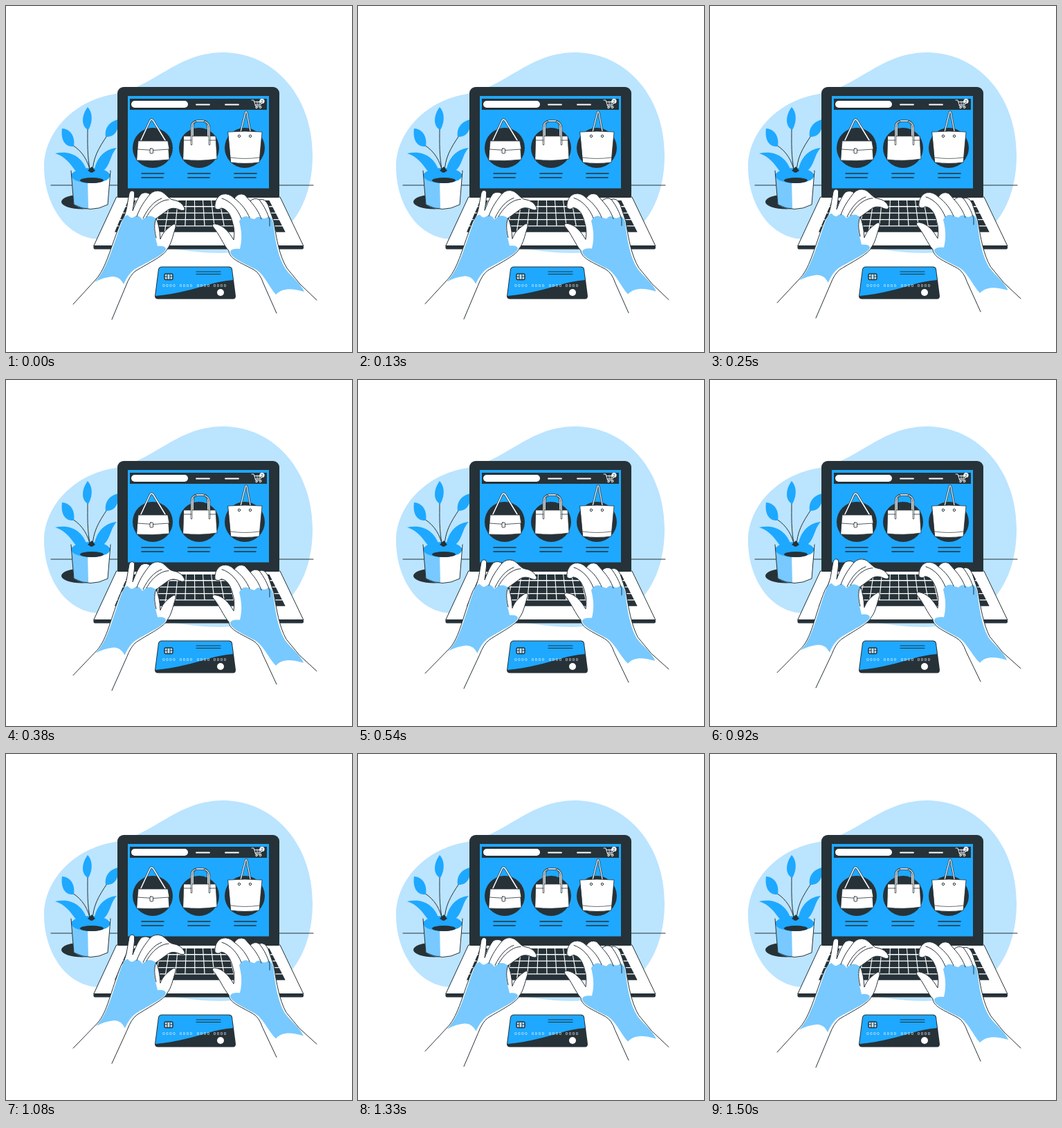
An HTML page with a canvas for the animation above (1.54 s loop, 500 by 500 pixels).

```html
<!DOCTYPE html>
<html lang="en">
<head>
<meta charset="utf-8">
<title>Online shopping</title>
<style>
html, body { margin: 0; width: 100%; height: 100%; overflow: hidden; background: #fff; }
canvas { display: block; width: 500px; height: 500px; }
</style>
</head>
<body>
<canvas id="stage"></canvas>
<script>
const LOOP = 1540, STEP = 1000 / 24, STEPS = 37;
const DARK = '#263238', BLUE = '#1ea8ff', SKIN = '#78c9ff', PALE = '#bbe4ff', WHITE = '#fff';

const canvas = document.getElementById('stage');
const ctx = canvas.getContext('2d');
const ratio = window.devicePixelRatio || 1;
canvas.width = canvas.height = 500 * ratio;

function paint(path, fill, stroke, width) {
  if (fill) { ctx.fillStyle = fill; ctx.fill(path); }
  if (stroke) { ctx.strokeStyle = stroke; ctx.lineWidth = width; ctx.stroke(path); }
}

function shape(d, fill, stroke, width = 1) {
  paint(new Path2D(d), fill, stroke, width);
}

function box(x, y, w, h, r, fill, stroke, width = 1) {
  const path = new Path2D();
  path.roundRect(x, y, w, h, r);
  paint(path, fill, stroke, width);
}

function oval(x, y, rx, ry, fill, stroke, width = 1) {
  const path = new Path2D();
  path.ellipse(x, y, rx, ry, 0, 0, Math.PI * 2);
  paint(path, fill, stroke, width);
}

function label(text, x, y, size, fill) {
  ctx.font = `${size}px "Liberation Sans", sans-serif`;
  ctx.textAlign = 'center';
  ctx.textBaseline = 'middle';
  ctx.fillStyle = fill;
  ctx.fillText(text, x, y);
}

function drawBackdrop() {
  shape('M55 232C55 185 95 137 158 127C215 116 248 67 314 67C390 68 443 133 443 215' +
    'C443 300 395 357 310 357C250 357 190 338 133 337C85 334 55 285 55 232Z', PALE);
  shape('M65 259H444', null, DARK);
}

function drawPlant() {
  oval(110, 283, 30, 10.5, DARK);
  shape('M94 240L98 287Q122 300 147 287L151 240Z', WHITE);
  shape('M94 240L98 287Q107 293 119 293.5L118 250Z', SKIN);
  oval(122.5, 245, 28, 11, BLUE);
  oval(124, 252, 17, 4, DARK);
  shape('M122 240C117 218 118 197 118 176M125 240C126 220 132 208 147 186M122 240C119 225 111 210 96 201',
    null, DARK);
  shape('M118 146C125 153 126 167 119 179C108 174 109 158 118 146Z', BLUE);
  shape('M81 177C94 178 100 189 98 203C84 204 79 192 81 177Z', BLUE);
  shape('M162 164C164 179 157 190 144 189C142 177 149 167 162 164Z', BLUE);
  shape('M71 213C94 208 111 218 118 241L102 240C94 230 86 217 71 213Z', BLUE);
  shape('M160 205C150 215 151 234 137 240H127C130 222 140 207 160 205Z', BLUE);
  shape('M118 238L124 232L129 238L124 241Z', DARK);
  shape('M94 238L98 287Q122 300 147 287L151 238', null, DARK);
}

function drawKeys() {
  const edge = (y, side) => side < 0 ? 176 - (y - 281) * 0.43 : 381 + (y - 281) * 0.51;
  const key = (top, bottom, from, to) => {
    const at = (y, k) => edge(y, -1) + (edge(y, 1) - edge(y, -1)) * k;
    shape(`M${at(top, from)} ${top}H${at(top, to)}L${at(bottom, to)} ${bottom}H${at(bottom, from)}Z`, DARK);
  };
  const columns = 17, gap = 0.0026;
  for (let r = 0; r < 5; r++) {
    const top = 281 + r * 9.4;
    for (let c = 0; c < columns; c++) {
      const span = r === 4 && c === 5 ? 7 : 1;
      key(top, top + 8.1, c / columns + gap, (c + span) / columns - gap);
      c += span - 1;
    }
  }
}

function drawLaptop() {
  shape('M160 276H396L430 347H127Z', WHITE, DARK);
  box(126.5, 346, 303.5, 5.5, 2, DARK);
  drawKeys();
  box(161, 117, 234, 160, [9, 9, 2, 2], DARK);
  box(176, 130, 204, 133.5, 0, BLUE);
  box(179, 134, 198, 16, 0, DARK);
  box(181, 137, 82, 10, 5, WHITE);
  shape('M275 142.5H294M317 142.5H336', null, WHITE, 1.8);
  shape('M355 136H358L361 145H369M359 138.5H370L368 143H360M363 138V143M366 138V143', null, WHITE, 0.9);
  oval(362, 146.5, 1.3, 1.3, null, WHITE);
  oval(367.5, 146.5, 1.3, 1.3, null, WHITE);
  oval(370, 137.5, 3.6, 3.6, WHITE);
  label('2', 370, 138, 6, DARK);
}

function drawGoods() {
  for (const x of [212, 279, 345]) oval(x, 205, 29, 29, DARK);
  for (const x of [196, 263, 330]) shape(`M${x} 242H${x + 32}M${x} 248H${x + 31}`, null, DARK, 1.6);

  const strap = (d, width) => { shape(d, null, DARK, width + 1.4); shape(d, null, WHITE, width); };

  strap('M195 194L208 166Q210 162 213 166L230 194', 1.5);
  shape('M191 195H234L236 222Q212 225 189 223Z', WHITE, DARK, 0.8);
  shape('M191 196L190 207Q212 210 236 207L234 196', WHITE, DARK, 0.8);
  box(208, 206, 4.5, 7, 1, WHITE, DARK, 0.9);

  strap('M270 190V174Q270 166 277 166H284Q291 166 292 174V190', 1.6);
  shape('M257 188H303L305 221Q280 225 256 222Z', WHITE, DARK, 0.8);
  strap('M268 200V176Q268 168 274 167M294 200V176Q293 168 287 167', 1.2);
  shape('M257 194H268M294 194H304', null, DARK, 0.8);

  strap('M338 186L346 154Q347 151 348 154L354 186', 1.2);
  shape('M321 182Q345 180 370 182L366 226Q345 229 325 226Z', WHITE, DARK, 0.8);
  shape('M325 219Q345 222 366 219', null, DARK, 0.7);
  oval(337, 188, 1.7, 1.7, WHITE, DARK);
  oval(353, 188, 1.7, 1.7, WHITE, DARK);
}

function drawCard() {
  shape('M224 376.5H322Q326 376.5 327 380L332 419Q332 423.5 328 423.5H219Q215 423 215 419L220 380Q221 377 224 376.5Z', DARK);
  shape('M224 377.5H322Q325 377.5 326 380L328 396C302 398 285 406 258 412Q238 417 216 419L221 380Q222 378 224 377.5Z', BLUE);
  shape('M275 384H310M275 387.5H310', null, DARK, 1.2);
  box(229, 387, 12, 8.5, 2, PALE, DARK, 1.4);
  shape('M229 391H233M237 391H241M233 388V395M237 388V395', null, DARK);
  for (const x of [235.5, 260, 285, 309]) label('0 0 0 0', x, 404.5, 6, WHITE);
  oval(310, 414, 5, 5, WHITE);
}

// p runs from 0 (fingers low) to 1 (fingers high).
function drawLeftHand(p) {
  const s = 3 * p;
  ctx.save();
  ctx.translate(0, -9 * p);
  const arm = `M97 431L${130 + s} 395C${145 + s} 378 151 349 166 312Q172 304 174 294`;
  const fingers = 'L178 271Q180 265 185 268Q187 271 183 296C187 286 191 276 196 271Q203 268 208 272' +
    'Q215 265 224 268C231 271 235 279 241 280Q254 282 258 292Q259 297 252 295Q242 290 235 294L217 307';
  const thumb = 'Q222 318 223 337C227 326 234 321 241 316Q246 313 245 320C241 332 239 344 233 351';
  const under = `C230 360 207 371 ${187 + s} 383Q${179 + s} 389 ${173 + s} 405L153 453`;
  shape(arm + fingers + thumb + under + 'Z', WHITE);
  shape(`M${128 + s} 399C${146 + s} 381 154 348 167 313Q171 302 176 302Q181 309 186 304Q192 301 197 309` +
    'Q205 302 211 304L217 307C211 320 216 333 219 347Q230 346 231 351C231 358 206 369 ' +
    `${185 + s} 381Q${176 + s} 388 ${170 + s} 402Q${164 + s} 390 ${153 + s} 391Q${141 + s} 392 ${128 + s} 399Z`, SKIN);
  shape(arm + fingers + thumb + under, null, DARK);
  shape('M208 272C201 281 194 290 189 304M235 280C224 280 211 290 203 305M225 278C214 282 205 292 198 307' +
    'M217 307C213 316 215 327 217 335', null, DARK);
  ctx.restore();
}

function drawRightHand(p) {
  const s = -2 * p;
  ctx.save();
  ctx.translate(0, -9 * p);
  const arm = `M391 444L${372 + s} 401Q${367 + s} 386 ${358 + s} 381C337 370 323 365 322 354`;
  const thumb = 'C314 345 308 329 299 319Q297 314 303 315C314 317 322 326 329 338Q331 324 328 315';
  const fingers = 'C325 302 320 293 311 292Q306 296 302 292C301 282 306 274 313 272Q322 270 330 278' +
    'Q336 269 345 273L353 282Q359 276 366 280Q374 277 379 288L387 312';
  const under = `C391 337 395 361 ${406 + s} 379L${425 + s} 402L449 425`;
  shape(arm + thumb + fingers + under + 'Z', WHITE);
  shape(`M390 417C${380 + s} 406 ${373 + s} 387 ${360 + s} 380C340 370 324 363 324 355Q326 350 338 351` +
    'C342 335 340 323 337 311Q341 303 348 304Q354 307 359 308Q364 302 369 306Q375 309 379 304Q384 305 386 313' +
    `C389 337 392 361 ${404 + s} 380C${413 + s} 392 ${427 + s} 402 ${431 + s} 413C${414 + s} 408 ${400 + s} 407 390 417Z`, SKIN);
  shape(arm + thumb + fingers + under, null, DARK);
  shape('M312 278C325 282 335 294 340 307M330 278C341 286 348 296 352 306M353 282C361 291 366 299 369 308' +
    'M366 280C373 289 378 299 381 309V318', null, DARK);
  ctx.restore();
}

function draw(now) {
  const step = Math.round((now % LOOP) / STEP) % STEPS;
  const lift = (1 - Math.cos(2 * Math.PI * step / STEPS)) / 2;
  ctx.setTransform(ratio, 0, 0, ratio, 0, 0);
  ctx.fillStyle = WHITE;
  ctx.fillRect(0, 0, 500, 500);
  ctx.lineJoin = ctx.lineCap = 'round';
  drawBackdrop();
  drawPlant();
  drawLaptop();
  drawGoods();
  drawCard();
  drawLeftHand(lift);
  drawRightHand(lift);
}

const start = performance.now();
function tick() {
  draw(performance.now() - start);
  requestAnimationFrame(tick);
}
tick();
</script>
</body>
</html>
```
